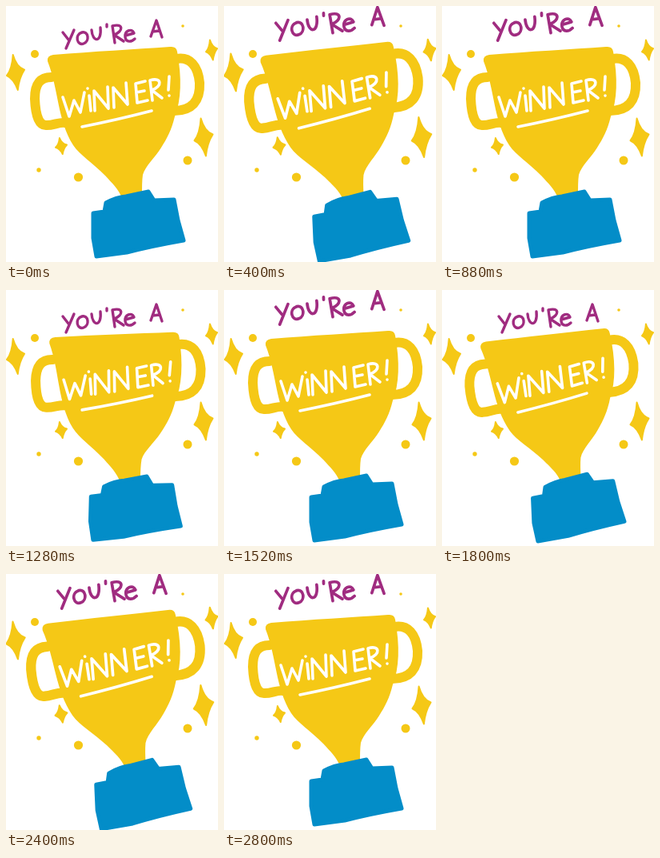
An HTML page for the animation above (2.84 s loop, 265 by 320 pixels).

```html
<!DOCTYPE html>
<html lang="en">
<head>
<meta charset="utf-8">
<title>You're a winner!</title>
<style>
  html, body { margin: 0; width: 100%; height: 100%; overflow: hidden; background: #fff; }
  svg { display: block; width: 100vw; height: 100vh; }
  .gold { fill: #f5c816; }
  .line { fill: none; stroke-linecap: round; stroke-linejoin: round; }
</style>
</head>
<body>
<svg viewBox="0 0 265 320" role="img" aria-label="You're a winner!">
  <g id="sparkles" class="gold"></g>
  <g id="trophy">
    <path class="line" stroke="#f5c816" stroke-width="12" d="M57 89C42 89 36 98 36 116C37 139 42 150 51 149C60 149 66 145 74 146M213 66C230 63 240 75 242 96C243 119 232 131 210 131"/>
    <path class="gold" d="M52 69Q51 62 59 61C110 57 160 54 205 51Q213 50 214 57C220 90 219 118 211 138C207 155 201 166 194 177C186 190 174 200 171 211C170 218 170 226 170 236L145 240C140 228 133 222 124 212C108 196 92 186 84 174C64 142 66 105 52 69Z"/>
    <path fill="#038dc8" stroke="#038dc8" stroke-width="5" stroke-linejoin="round" d="M125 246Q138 239 150 238L178 232L185 243L210 242L215 268L222 293Q182 300 151 308L113 313L109 290L109 259L123 257Z"/>
    <path class="line" stroke="#fff" stroke-width="3.6" d="M71 114L79 138L85 118L93 133L98 108M104 112L106 131M102 103v.1M111 131L110 106L128 128L127 101M135 127L134 102L152 123L150 96M174 94L162 97L164 121L177 118M163 108L173 106M183 118L180 93C195 88 196 101 182 105L195 115M204 88L203 105M204 112v.1M95 151Q140 142 182 131"/>
  </g>
  <path id="heading" class="line" stroke="#a02c80" stroke-width="3.4" d="M71 33L78 42M85 30L75 53M95 33C85 36 89 50 97 47C105 44 103 31 95 33M107 30C108 46 120 46 118 27M126 23v3M136 46L133 25C147 21 147 32 135 36L147 44M149 37L160 34C157 27 148 31 149 39C150 46 157 45 161 41M181 38L188 18L195 39M183 32L192 31"/>
</svg>
<script>
const LOOP = 2840, STEP = 40, START = 320, SETTLE = 2400;
const HOLD = 220, BEAT = 260;
const TILTS = [-2.5, 1.5, 0];
const byId = id => document.getElementById(id);

// x, y, half width, half height
const stars = [[12, 83, 11, 22], [247, 164, 11.5, 23.5], [257, 55, 7, 12.5], [69, 175, 7, 10]];
// x, y, radius
const dots = [[36, 60, 5], [221, 25, 1.8], [227, 193, 5.5], [41, 205, 2.7], [90.5, 214, 5.6]];

const starPath = (w, h) =>
  `M${-w * .3} ${-h}Q${w * .1} ${-h * .3} ${w} ${-h * .15}Q${w * .4} ${h * .3} ${w * .25} ${h}` +
  `Q${-w * .2} ${h * .35} ${-w} ${h * .18}Q${-w * .4} ${-h * .2} ${-w * .3} ${-h}Z`;

byId("sparkles").innerHTML =
  stars.map(([x, y, w, h]) => `<g transform="translate(${x} ${y})"><path d="${starPath(w, h)}" stroke="#f5c816" stroke-width="2" stroke-linejoin="round"/></g>`).join("") +
  dots.map(([x, y, r]) => `<circle cx="${x}" cy="${y}" r="${r}"/>`).join("");

const smooth = x => { x = Math.max(0, Math.min(1, x)); return x * x * (3 - 2 * x); };

// The trophy cycles through three tilts, easing quickly into each one
function tiltAt(t) {
  if (t < START) return 0;
  const phase = (t - START) / HOLD, i = Math.floor(phase);
  const from = TILTS[(i + 2) % 3], to = TILTS[i % 3];
  return from + (to - from) * smooth((phase - i) / .25);
}

// Swelling around a moment, from 0 to 1 and back
const swell = (t, centre) => smooth(1.6 - Math.abs(t - centre) / 110);

const headingRaised = t =>
  t >= SETTLE || (t >= START && Math.floor((t - START) / BEAT) % 2 === 0);

function draw(now) {
  const t = Math.floor(now % LOOP / STEP) * STEP;
  const grow = Math.max(swell(t, 430), swell(t, 2460));
  byId("trophy").setAttribute("transform",
    `translate(138 155) rotate(${tiltAt(t)}) scale(${1 + .03 * grow}) translate(-138 -155)`);
  byId("heading").setAttribute("transform",
    headingRaised(t) ? "translate(132.5 25) rotate(-1.5) scale(1.09) translate(-133 -38)" : "");
  for (const star of document.querySelectorAll("#sparkles path"))
    star.setAttribute("transform", `scale(${1 + .06 * grow})`);
  requestAnimationFrame(draw);
}
requestAnimationFrame(draw);
</script>
</body>
</html>
```
